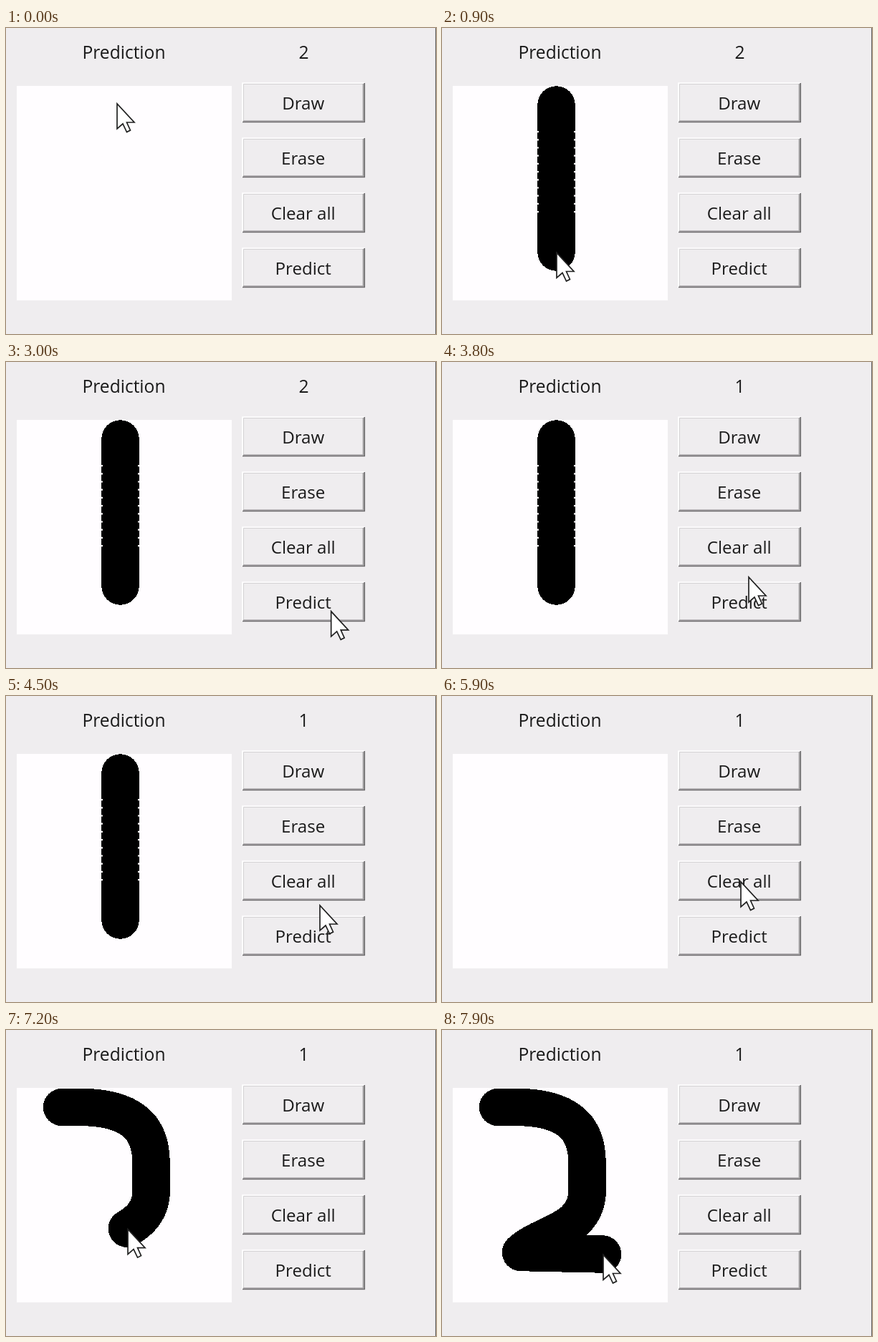
Animation, 600 px wide and 428 px high, one loop 8000 ms. Source, as an HTML page:

```html
<!DOCTYPE html>
<html lang="en">
<head>
<meta charset="utf-8">
<title>Digit prediction</title>
<style>
  html, body { margin: 0; width: 100%; height: 100%; overflow: hidden; background: #efedef; }
  svg { display: block; }
  text { font: 24.6px "Open Sans", "Noto Sans", sans-serif; text-anchor: middle; fill: #1a1a1a; }
  #buttons text { font-size: 24.1px; }
  .brush { fill: none; stroke: #000; stroke-width: 52.5; stroke-linecap: round; shape-rendering: crispEdges; }
</style>
</head>
<body>
<svg width="600" height="428">
  <rect width="600" height="428" fill="#efedef"/>
  <rect x="599" width="1" height="428" fill="#666"/>
  <text x="164.5" y="43">Prediction</text>
  <text id="result" x="415.5" y="43">2</text>
  <g id="buttons"></g>
  <rect x="15" y="81" width="300" height="300" fill="#fffdff"/>
  <path id="one" class="brush" d="M159.500 107.500V313.500"/>
  <!-- brush notches, same colour as the canvas -->
  <path d="M134 144V259M185 144V259" fill="none" stroke="#fffdff" stroke-width="2" stroke-dasharray="2.200 9"/>
  <path id="two" class="brush" stroke-linejoin="round"
    d="M78 108H112C185 111 202.500 145 202.500 186V230C198 282 140 283 110 311L224 313.500"/>
  <path id="cursor" d="M1 1V36L9 29L14.500 40.500L19.500 38L14.500 27H25Z" fill="#fff" stroke="#222" stroke-width="1.700"/>
</svg>
<script>
const LOOP = 8000, STEP = 100;
const [one, two, cursor, result, buttons] =
  ['one', 'two', 'cursor', 'result', 'buttons'].map(id => document.getElementById(id));

buttons.innerHTML = ['Draw', 'Erase', 'Clear all', 'Predict'].map((label, i) => `
  <g transform="translate(330 ${77 + 77 * i})" fill="none" stroke-width="1.700">
    <path d="M0 55V0H170" stroke="#fff"/>
    <path d="M1.500 53V1.500H168" stroke="#d4d2d4" stroke-width="1"/>
    <path d="M1 53H168.500V1" stroke="#a3a1a3"/>
    <path d="M0 54.500H170.200V0" stroke="#6c6a6c"/>
    <text x="84.700" y="36.600">${label}</text>
  </g>`).join('');

const oneLength = one.getTotalLength(), twoLength = two.getTotalLength();
const baseLength = 114;   // bottom bar of the 2

// Pointer stops outside the strokes: time, x, y
const stops = [
  [950, 159, 313], [1500, 185, 432], [2500, 520, 440], [3200, 436, 325], [3800, 427, 300],
  [4100, 452, 364], [4500, 437, 292], [4900, 416, 259], [5900, 416, 259], [6300, 77, 109]
];

function ease(t, from, to) {
  const p = Math.min(1, Math.max(0, (t - from) / (to - from)));
  return p * p * (3 - 2 * p);
}

function pointer(t) {
  let [, x, y] = stops[0];
  for (let i = 1; i < stops.length; i++) {
    const [from, x0, y0] = stops[i - 1], [to, x1, y1] = stops[i];
    const p = ease(t, from, to);
    x += (x1 - x0) * p;
    y += (y1 - y0) * p;
  }
  return { x, y };
}

function reveal(stroke, length, shown) {
  stroke.style.display = shown ? '' : 'none';
  stroke.setAttribute('stroke-dasharray', `${length} 1000`);
}

function render(t) {
  const oneDrawn = oneLength * ease(t, 200, 850);
  const twoDrawn = (twoLength - baseLength) * ease(t, 6700, 7400) + baseLength * ease(t, 7600, 7900);
  reveal(one, oneDrawn, oneDrawn > 0 && t < 5200);
  reveal(two, twoDrawn, twoDrawn > 0);

  let tip = pointer(t);
  if (t < 950) {
    const settle = 1 - ease(t, 0, 150);
    tip = { x: 159 - 5 * settle, y: 107.5 - 2.5 * settle + oneDrawn };
  } else if (twoDrawn > 0) {
    tip = two.getPointAtLength(twoDrawn);
  }
  cursor.setAttribute('transform', `translate(${tip.x} ${tip.y})`);
  result.textContent = t < 3400 ? '2' : '1';
}

const start = performance.now();
function frame() {
  const t = (performance.now() - start) % LOOP;
  render(Math.floor(t / STEP) * STEP);
  requestAnimationFrame(frame);
}
frame();
</script>
</body>
</html>
```
